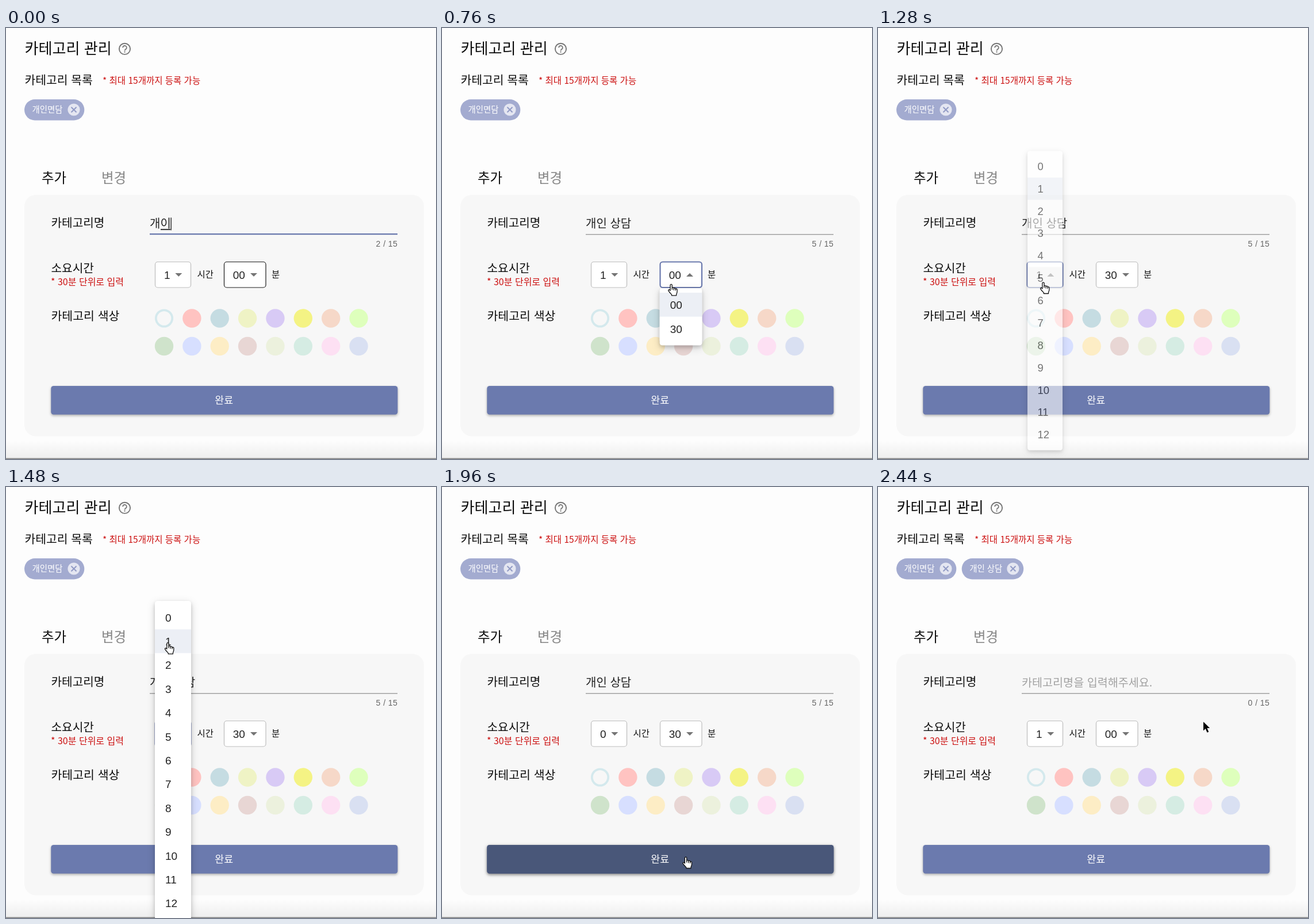
An HTML page that plays this animation: 748x749 px, repeating every 2880 ms.

```html
<!DOCTYPE html>
<html lang="ko">
<head>
<meta charset="utf-8">
<style>
  html, body { margin: 0; width: 100%; height: 100%; overflow: hidden; background: #fdfdfd; }
  svg { display: block; width: 748px; height: 749px; }
  text { font-family: "Noto Sans CJK KR", "Noto Sans CJK", sans-serif; white-space: pre; }
  text.num { font-family: "Liberation Sans", Arial, sans-serif; }
</style>
</head>
<body>
<svg id="stage" viewBox="0 0 748 749" xmlns="http://www.w3.org/2000/svg">
  <defs>
    <linearGradient id="fade" x1="0" y1="0" x2="0" y2="1">
      <stop offset="0" stop-color="#fdfdfd"/><stop offset="1" stop-color="#eeeeee"/>
    </linearGradient>
  </defs>
</svg>
<script>
const LOOP = 2880, STEP = 40;
const BLUE = '#6b7aae', INK = '#0c0c0c', VALUE = '#212121', RED = '#cc1010', CHIP = '#a3abd0';
const stage = document.getElementById('stage');

function add(tag, attrs, parent = stage) {
  const node = document.createElementNS('http://www.w3.org/2000/svg', tag);
  set(node, attrs);
  parent.appendChild(node);
  return node;
}
function set(node, attrs) {
  for (const key in attrs) node.setAttribute(key, attrs[key]);
}
function show(node, visible) {
  node.style.display = visible ? '' : 'none';
}
function box(x, y, width, height, rx, fill, parent) {
  return add('rect', { x, y, width, height, rx, fill }, parent);
}
// Text is placed by its left edge and the vertical middle of its glyphs.
function hangul(str, x, mid, size, fill = INK, weight = 500, parent) {
  const node = add('text', { x, y: mid + size * 0.38, 'font-size': size, 'font-weight': weight, fill }, parent);
  node.textContent = str;
  return node;
}
function number(str, x, mid, size, fill = VALUE, parent) {
  const node = add('text', { class: 'num', x, y: mid + size * 0.36, 'font-size': size, fill }, parent);
  node.textContent = str;
  return node;
}

function chip(label, x, width) {
  const g = add('g', {});
  box(x, 124, width, 36.5, 18.2, CHIP, g);
  hangul(label, x + 13.5, 141.5, 14.4, '#fff', 500, g);
  const cx = x + width - 18.3;
  add('circle', { cx, cy: 142, r: 10.6, fill: '#e4e6f1' }, g);
  add('path', { d: `M${cx - 4.5} 137.5l9 9m0 -9l-9 9`, stroke: '#929bc6', 'stroke-width': 2 }, g);
  return g;
}

function select(x, width, textX, arrowX) {
  const frame = add('rect', { y: 406.5, height: 44.5, x, width, rx: 4.5, fill: '#fff' });
  const value = number('', textX, 429, 19);
  const arrow = add('path', { fill: '#757575' });
  return (str, open, border) => {
    value.textContent = str;
    const dir = open ? -1 : 1;
    set(arrow, { d: `M${arrowX - 6} ${429 - 3 * dir}h12l-6 ${6 * dir}z` });
    set(frame, {
      stroke: { idle: '#bdbdbd', hover: '#1c1c1c', focus: BLUE }[border],
      'stroke-width': border === 'focus' ? 2.2 : 1.2
    });
  };
}

function menu(labels, x, width, top, itemHeight) {
  const g = add('g', {});
  const paper = box(x, top, width, labels.length * itemHeight + 16, 4.5, '#fff', g);
  paper.style.filter = 'drop-shadow(0 3px 3px rgba(0,0,0,.16)) drop-shadow(0 4px 7px rgba(0,0,0,.16))';
  const rows = labels.map((label, i) => {
    const y = top + 8 + i * itemHeight;
    const row = box(x, y, width, itemHeight, 0, '#fff', g);
    number(label, x + 18, y + itemHeight / 2, 19, VALUE, g);
    return row;
  });
  const cx = x + width / 2, cy = 452;
  return (t, opened, closed, duration, selected, pointerY) => {
    const leaving = t >= closed;
    const p = (t - (leaving ? closed : opened)) / duration;
    show(g, t > opened && !(leaving && p >= 1));
    const alpha = leaving ? 1 - ease(p) : ease(p);
    const grown = leaving ? 1 - ease((p - 1 / 3) * 1.5) : ease(p * 1.5);
    const s = 0.75 + 0.25 * grown;
    set(g, { opacity: alpha, transform: `translate(${cx} ${cy}) scale(${s} ${s * s}) translate(${-cx} ${-cy})` });
    const hovered = Math.floor((pointerY - top - 8) / itemHeight);
    rows.forEach((row, i) => set(row, {
      fill: i === selected ? '#eceff5' : i === hovered && !leaving ? '#f5f5f5' : '#fff'
    }));
  };
}

// cubic-bezier(.4, 0, .2, 1)
function ease(x) {
  if (x <= 0) return 0;
  if (x >= 1) return 1;
  let lo = 0, hi = 1, u;
  for (let i = 0; i < 20; i++) {
    u = (lo + hi) / 2;
    const bx = 1.2 * (1 - u) ** 2 * u + 0.6 * (1 - u) * u * u + u ** 3;
    if (bx < x) lo = u; else hi = u;
  }
  return 3 * (1 - u) * u * u + u ** 3;
}
const lastBefore = (list, t) => list.filter(item => item[0] <= t).pop();

// Page
box(0, 718, 748, 30, 0, 'url(#fade)');
box(0, 747.5, 748, 1.5, 0, '#858585');
hangul('카테고리 관리', 32.5, 35.5, 26.1);
add('circle', { cx: 206.5, cy: 36.3, r: 9.6, fill: 'none', stroke: '#757575', 'stroke-width': 1.9 });
add('path', {
  d: 'M203.2 34.2a3.3 3.3 0 1 1 5.4 2.4c-1.3 1-2.1 1.5-2.1 3', fill: 'none', stroke: '#757575', 'stroke-width': 1.8
});
box(205.5, 40.6, 2, 2, 0, '#757575');
hangul('카테고리 목록', 32.5, 90, 20.4);
hangul('* 최대 15개까지 등록 가능', 168, 91, 15.5, RED, 400);
chip('개인면담', 32, 104.3);
const newChip = chip('개인 상담', 145.7, 107.5);
hangul('추가', 62, 260.5, 23.4);
hangul('변경', 166, 260.5, 23.4, '#858585');

// Form
box(32, 290, 695, 419.5, 20, '#f7f7f7');
hangul('카테고리명', 78.5, 338, 20.2);
hangul('소요시간', 78.5, 417.5, 20.2);
hangul('* 30분 단위로 입력', 78, 440.5, 16, RED, 400);
hangul('카테고리 색상', 78.5, 500, 20.5);
hangul('시간', 332.5, 428, 15.4);
hangul('분', 462, 428, 15.4);

const field = hangul('', 250, 339.5, 20, VALUE, 400);
const placeholder = hangul('카테고리명을 입력해주세요.', 250, 339.5, 19.6, '#a2a2a2', 400);
const underline = add('rect', { x: 250, width: 431 });
const composing = box(0, 349.3, 17, 1.8, 0, VALUE);
const caret = box(0, 329.5, 1.3, 22, 0, '#111');
const counter = number('', 643.6, 375, 14, '#666');
set(counter, { 'letter-spacing': 0.45 });

const hours = select(259.5, 62, 275, 300.3);
const minutes = select(379.5, 72.5, 394.7, 431);

const colors = [
  'none', '#ffc3c1', '#c5dce2', '#eff3c5', '#d8caf5', '#f4f384', '#f6d8c8', '#deffbc',
  '#cfe3cb', '#d7dfff', '#fdedc5', '#e8d6d4', '#ecf1dd', '#d5ece3', '#fde0f3', '#d9e0f2'
];
colors.forEach((fill, i) => {
  const ring = fill === 'none';
  add('circle', {
    cx: 275 + (i % 8) * 48.36, cy: i < 8 ? 504.5 : 553, r: ring ? 14.2 : 16.2,
    fill, stroke: ring ? '#d4e9ed' : 'none', 'stroke-width': 3.8
  });
});

const button = box(78.3, 622, 603, 49.8, 4.5, BLUE);
button.style.filter = 'drop-shadow(0 2px 2px rgba(0,0,0,.3))';
const buttonHover = box(78.3, 622, 603, 49.8, 4.5, '#495779');
buttonHover.style.filter = 'drop-shadow(0 2px 3px rgba(0,0,0,.25))';
hangul('완료', 363.3, 646, 17.3, '#fff');

const minuteMenu = menu(['00', '30'], 378.7, 73.6, 452, 41.8);
const hourMenu = menu([...Array(13).keys()], 259, 63, 198, 41.4);

// Pointers, both with their hot spot at 0,0
const hand = add('path', {
  d: 'M-1.6 11V1.7a1.6 1.6 0 0 1 3.2 0V9V7a1.5 1.5 0 0 1 3 .2V10V7.8a1.5 1.5 0 0 1 3 .3V10.5V9.2a1.4 1.4 0 0 1 2.8 .2' +
     'V13c0 2.2-1.4 3-1.4 5.2V19.5H.8V18c-1.6-2-5-5-5.6-6.8c-.6-1.6 1.3-2.4 2.3-1.2z',
  fill: '#fff', stroke: '#111', 'stroke-width': 1.3, 'stroke-linejoin': 'round'
});
const arrow = add('path', {
  d: 'M0 0V15.5L3.7 12.1L6.6 18.8L9.3 17.6L6.4 11.1H11.2Z',
  fill: '#000', stroke: '#fff', 'stroke-width': 1.3, 'paint-order': 'stroke'
});

const typing = [
  [0, '개이'], [80, '개인'], [160, '개인 '], [200, '개인 ㅅ'], [240, '개인 사'],
  [280, '개인 상'], [320, '개인 상ㄷ'], [400, '개인 상다'], [440, '개인 상담']
];
const path = [
  [520, 388, 451], [600, 396, 437], [720, 397, 440], [960, 407, 472], [1040, 407, 512], [1120, 404, 512],
  [1240, 288, 443], [1320, 287, 441], [1520, 280, 228], [1640, 279, 220], [1720, 290, 250],
  [1880, 420, 640], [1960, 424, 643], [2160, 424, 643], [2240, 574, 394], [2320, 573, 396], [2440, 566, 408]
];
const RESET = 2040;

function pointerAt(t) {
  const next = path.findIndex(point => point[0] > t);
  if (next < 1) return next < 0 ? path[path.length - 1].slice(1) : path[0].slice(1);
  const [t0, x0, y0] = path[next - 1], [t1, x1, y1] = path[next];
  const k = (t - t0) / (t1 - t0);
  return [x0 + (x1 - x0) * k, y0 + (y1 - y0) * k];
}

function drawField(t) {
  const text = t >= RESET ? '' : lastBefore(typing, t)[1];
  const end = 250 + [...text].reduce((w, c) => w + (c === ' ' ? 4.48 : 18.4), 0);
  const focused = t < 600;
  field.textContent = text;
  show(placeholder, !text);
  counter.textContent = `${text.length} / 15`;
  set(composing, { x: end - 17.8 });
  show(composing, focused && !text.endsWith(' '));
  set(caret, { x: end - 0.3 });
  show(caret, t < 480);
  set(underline, focused
    ? { y: 357, height: 2.3, fill: BLUE }
    : { y: 358.2, height: 1.2, fill: '#8c8c8c' });
}

function draw(t) {
  const [x, y] = pointerAt(t);
  drawField(t);
  const reset = t >= RESET;
  show(newChip, reset);

  minutes(t >= 1080 && !reset ? '30' : '00', t >= 600 && t < 1080,
    t < 600 ? 'hover' : t < 1240 ? 'focus' : 'idle');
  hours(t >= 1587 && !reset ? '0' : '1', t >= 1240 && t < 1587,
    t >= 1240 && t < 1960 ? 'focus' : 'idle');
  minuteMenu(t, 620, 1080, 65, t < 1080 ? 0 : 1, y);
  hourMenu(t, 1240, 1587, 100, t < 1587 ? 1 : 0, y);

  set(buttonHover, { opacity: ease((t - 1840) / 70) - ease((t - 2165) / 70) });

  const isHand = t < 1600 || (t >= 1880 && t < 2180);
  show(hand, t >= 520 && isHand);
  show(arrow, !isHand);
  set(isHand ? hand : arrow, { transform: `translate(${x} ${y})` });
}

const start = performance.now();
function tick() {
  const t = (performance.now() - start) % LOOP;
  draw(Math.floor(t / STEP) * STEP);
  requestAnimationFrame(tick);
}
draw(0);
requestAnimationFrame(tick);
</script>
</body>
</html>
```
